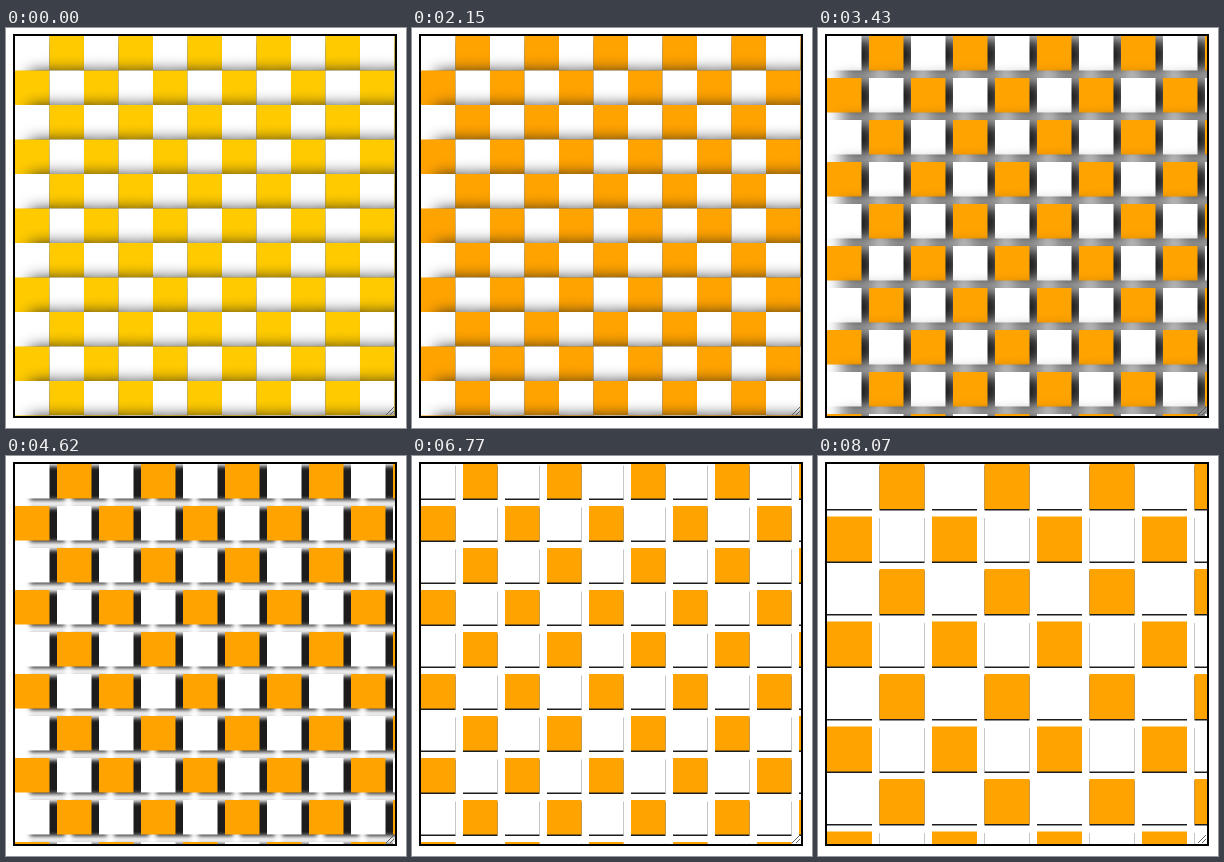
An HTML page with a canvas that plays this animation: 400x400 px, repeating every 9380 ms.

```html
<!DOCTYPE html>
<html lang="en">
<head>
<meta charset="utf-8">
<title>Checkerboard</title>
<style>
  html, body { margin: 0; width: 100%; height: 100%; overflow: hidden; background: #fff; }
  canvas { display: block; width: 400px; height: 400px; }
</style>
</head>
<body>
<canvas id="board" width="400" height="400"></canvas>
<script>
  const ctx = document.getElementById('board').getContext('2d');
  const LOOP = 9380;
  const UNIT = 0.75; // stage pixels per board pixel
  const LEFT = 9, TOP = 8, SIDE = 380;
  const INK = '#1c1c1c';
  const OFFSET_Y = 2 * UNIT;

  // Each setting moves by one step at every listed time.
  const settings = {
    green: { from: 203, step: -6.667, at: [1480, 1530, 1930, 2000, 2070, 2150] },
    gap:   { from: 0, step: 2, at: [2900, 2980, 3060, 3310, 3430] },
    blur:  { from: 20, step: -2, at: [4260, 4320, 4380, 4440, 4500, 4560, 4620, 4700, 4760, 4980] },
    shift: { from: 20, step: -2, at: [5560, 5610, 5670, 5720, 5780, 5830, 5890, 5940, 6100, 6770] },
    size:  { from: 46, step: 2, at: [7610, 7660, 7720, 7790, 7870, 7920, 8070] }
  };

  function valueAt({ from, step, at }, t) {
    return from + step * at.filter(time => time <= t).length;
  }

  function drawCell(x, y, size, color, shift, blur) {
    if (blur > 0) {
      ctx.shadowColor = INK;
      ctx.shadowBlur = blur;
      ctx.shadowOffsetX = shift;
      ctx.shadowOffsetY = OFFSET_Y;
    } else {
      ctx.fillStyle = INK;
      ctx.fillRect(x + shift, y + OFFSET_Y, size, size);
    }
    ctx.fillStyle = color;
    ctx.fillRect(x, y, size, size);
  }

  function drawCells(t) {
    const size = valueAt(settings.size, t) * UNIT;
    const pitch = size + valueAt(settings.gap, t) * UNIT;
    const blur = valueAt(settings.blur, t) * UNIT;
    const shift = valueAt(settings.shift, t) * UNIT;
    const accent = `rgb(255, ${Math.round(valueAt(settings.green, t))}, 0)`;
    const count = Math.ceil(SIDE / size);

    ctx.save();
    ctx.beginPath();
    ctx.rect(LEFT, TOP, SIDE, SIDE);
    ctx.clip();
    for (let row = 0; row < count; row++) {
      for (let col = 0; col < count; col++) {
        const color = (row + col) % 2 ? accent : '#fff';
        drawCell(LEFT + col * pitch, TOP + row * pitch, size, color, shift, blur);
      }
    }
    ctx.restore();
  }

  function drawFrame() {
    ctx.strokeStyle = '#000';
    ctx.lineWidth = 2;
    ctx.strokeRect(LEFT - 1, TOP - 1, SIDE + 2, SIDE + 2);

    // Resize grip
    ctx.strokeStyle = '#555';
    ctx.lineWidth = 0.9;
    ctx.beginPath();
    for (const length of [8, 4]) {
      ctx.moveTo(388 - length, 387);
      ctx.lineTo(388, 387 - length);
    }
    ctx.stroke();
  }

  const changes = Object.values(settings).flatMap(s => s.at);
  let shown = -1;

  function render(t) {
    const stage = changes.filter(time => time <= t).length;
    if (stage === shown) return;
    shown = stage;
    ctx.fillStyle = '#fff';
    ctx.fillRect(0, 0, 400, 400);
    drawCells(t);
    drawFrame();
  }

  const start = performance.now();
  function tick() {
    render((performance.now() - start) % LOOP);
    requestAnimationFrame(tick);
  }
  tick();
</script>
</body>
</html>
```
